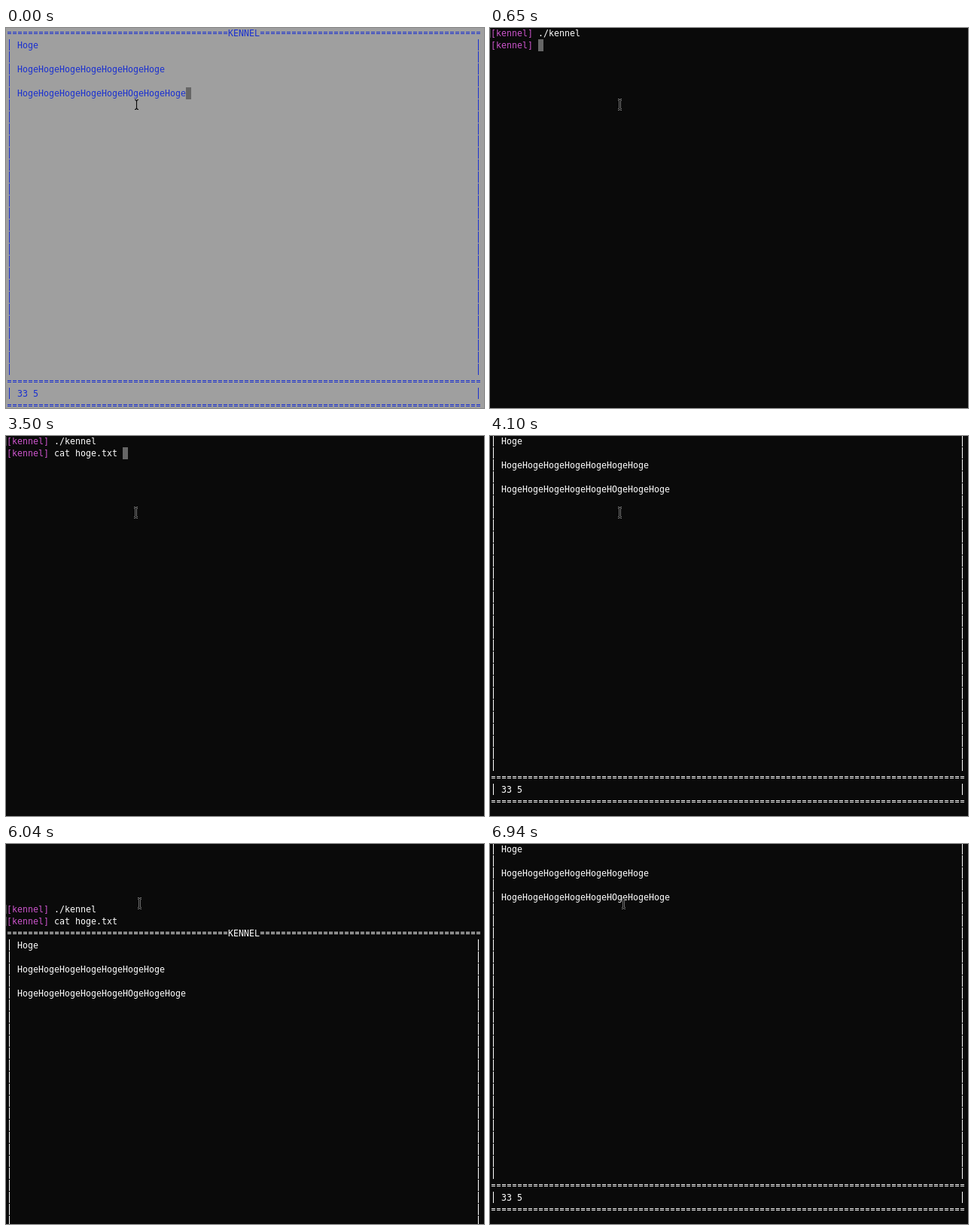
An HTML page with a canvas for the animation above (8000 ms loop, 635 px wide and 506 px high).

```html
<!DOCTYPE html>
<html>
<head>
<meta charset="utf-8">
<style>
html, body { margin: 0; width: 100%; height: 100%; overflow: hidden; background: #0a0a0a; }
canvas { display: block; }
</style>
</head>
<body>
<canvas id="stage" width="635" height="506"></canvas>
<script>
const ctx = document.getElementById('stage').getContext('2d');
const COLS = 90, CW = 7, CH = 16, LOOP = 8000;
const BODY = { 1: 'Hoge', 3: 'Hoge'.repeat(7), 5: 'Hoge'.repeat(5) + 'HOge' + 'Hoge'.repeat(2), 30: '33 5' };
const BEAM = new Path2D('M1 1.5Q3.5 1.5 3.5 4V12Q3.5 14.5 1 14.5M6 1.5Q3.5 1.5 3.5 4V12Q3.5 14.5 6 14.5');

const colX = c => 1 + c * CW;
const rowY = r => r * CH - 1;

function rect(x, y, w, h, color) {
  ctx.fillStyle = color;
  ctx.fillRect(x, y, w, h);
}

function text(str, col, row, color) {
  ctx.fillStyle = color;
  [...str].forEach((ch, i) => ctx.fillText(ch, colX(col + i) + CW / 2, rowY(row) + 12));
}

function rule(from, to, row, color) {
  for (let c = from; c < to; c++)
    for (const dy of [6, 8]) rect(colX(c) + 1, rowY(row) + dy, 5, 1, color);
}

function caret(col, row) {
  rect(colX(col), rowY(row), CW, CH, '#666');
}

function editor(top, ink) {
  rule(0, 42, top, ink);
  text('KENNEL', 42, top, ink);
  rule(48, COLS, top, ink);
  for (let r = 1; r < 31; r++) {
    if (r === 29) continue;
    for (const c of [0, COLS - 1]) rect(colX(c) + 3, rowY(top + r), 1, 15, ink);
  }
  for (const r in BODY) text(BODY[r], 2, top + +r, ink);
  rule(0, COLS, top + 29, ink);
  rule(0, COLS, top + 31, ink);
}

function prompt(row, command, marked) {
  if (marked) rect(0, rowY(row) + 2, 1, 12, '#444');
  text('[kennel]', 0, row, '#cc55cc');
  text(command, 9, row, '#fff');
}

function pointer(x, y) {
  ctx.save();
  ctx.translate(x, y);
  for (const [width, color] of [[2.4, '#aaa'], [1.2, '#0a0a0a']]) {
    ctx.lineWidth = width;
    ctx.strokeStyle = color;
    ctx.stroke(BEAM);
  }
  ctx.restore();
}

// Four keys at a steady pace, a pause, one more key, then tab completion.
function typed(t) {
  const command = 'cat hoge.txt ';
  if (t >= 3500) return command;
  const keys = Math.floor((t - 2300) / 150);
  return command.slice(0, t >= 3350 ? 5 : Math.max(0, Math.min(4, keys)));
}

// Row of the first prompt: output pushes it off the top, then the view scrolls back and returns.
function scrollRow(t) {
  if (t < 4100) return 0;
  if (t < 5890 || t >= 6940) return -3;
  return t < 6040 ? 4 : t < 6490 ? 5 : t < 6790 ? 2 : 0;
}

function shell(t) {
  const top = scrollRow(t), done = t >= 3950;
  prompt(top, './kennel', true);
  if (t < 650) {
    caret(0, 1);
  } else {
    const command = typed(t);
    prompt(top + 1, command, done);
    if (done) editor(top + 2, '#fff');
    else caret(9 + command.length, 1);
  }
  // The pointer swings up and back down along a parabola in four steps.
  const k = Math.max(0, Math.min(4, Math.floor((t - 4853) / 145.5)));
  pointer(Math.round(169 + 0.33 * k * k), Math.round(94 - 39.4 * k + 8.4 * k * k));
}

function draw(now) {
  const t = now % LOOP, editing = t < 500;
  rect(0, 0, 635, 506, editing ? '#9f9f9f' : '#0a0a0a');
  ctx.font = '11.6px "DejaVu Sans Mono", monospace';
  ctx.textAlign = 'center';
  if (editing) {
    editor(0, '#1a30d0');
    caret(34, 5);
    pointer(170, 94);
  } else {
    shell(t);
  }
}

const start = performance.now();
function tick() {
  draw(performance.now() - start);
  requestAnimationFrame(tick);
}
tick();
</script>
</body>
</html>
```
